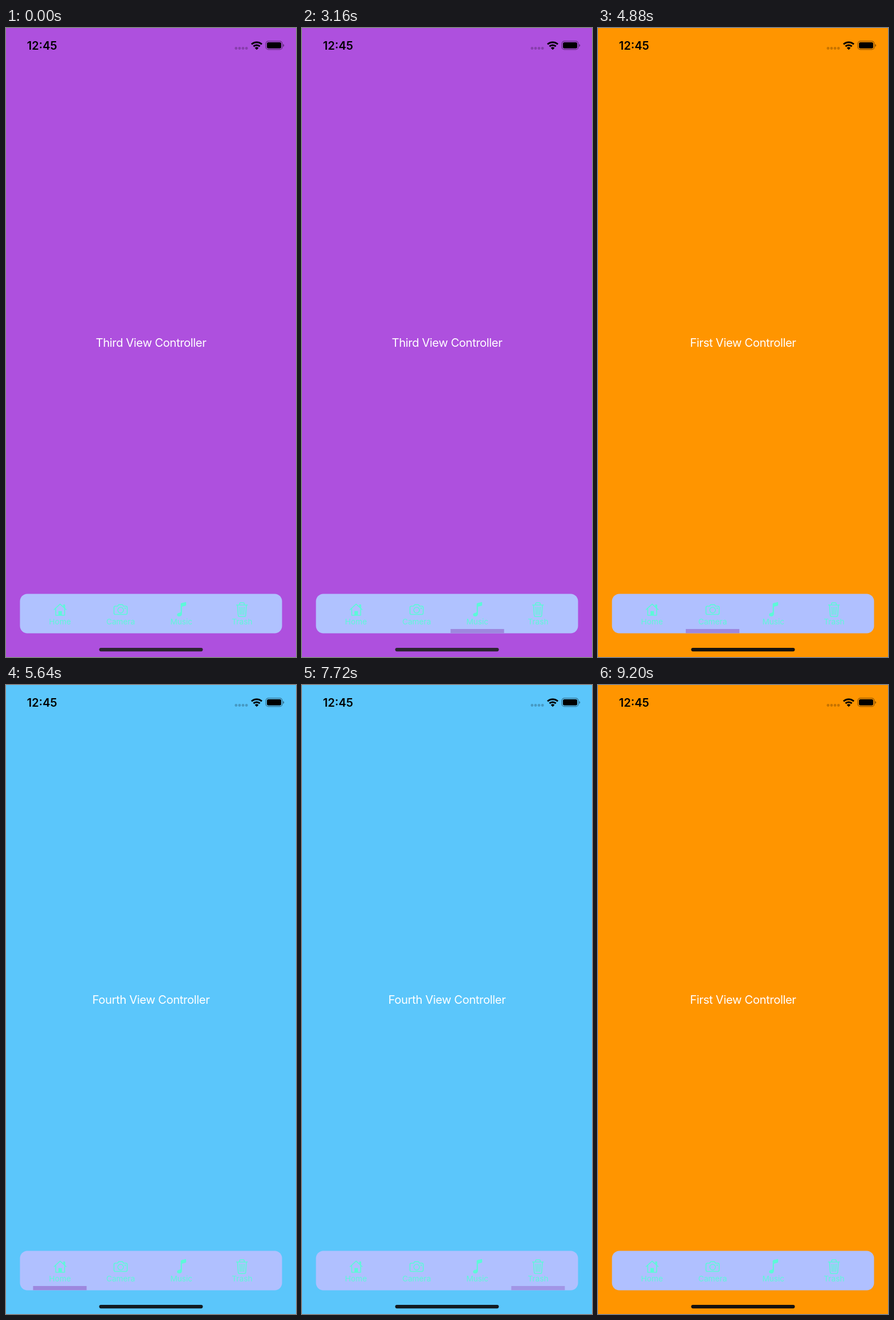
An HTML page for the animation above (9.24 s loop, 509 by 1101 pixels).

```html
<!DOCTYPE html>
<html lang="en">
<head>
<meta charset="utf-8">
<style>
  html, body { margin: 0; width: 100%; height: 100%; overflow: hidden; }
  svg { display: block; width: 509px; height: 1101px; font-family: Inter, Roboto, sans-serif; }
  text { text-anchor: middle; }
  .tabs { fill: none; stroke: #5cf9d8; stroke-width: 1.6; stroke-linejoin: round; stroke-linecap: round; }
  .tabs text { font-size: 13.7px; }
  .tabs text, .tabs .solid { fill: #5cf9d8; stroke: none; }
</style>
</head>
<body>
<svg viewBox="0 0 509 1101">
  <rect id="back" width="509" height="1101"/>

  <text x="63.3" y="38" font-size="20" font-weight="600">12:45</text>
  <g opacity=".22">
    <circle cx="403.8" cy="35.5" r="2.4"/><circle cx="409.9" cy="35.5" r="2.4"/>
    <circle cx="416" cy="35.5" r="2.4"/><circle cx="422.1" cy="35.5" r="2.4"/>
  </g>
  <path d="M431 28.5a13 13 0 0 1 18 0M434.4 32.2a8.2 8.2 0 0 1 11.2 0" fill="none" stroke="#000" stroke-width="3"/>
  <path d="M436.6 34.8a5 5 0 0 1 6.8 0L440 38.2z"/>
  <rect x="456.1" y="23.2" width="28.8" height="14.4" rx="4.2" fill="none" stroke="#000" stroke-width="1.2" opacity=".45"/>
  <rect x="458" y="25.1" width="25" height="10.6" rx="2.5"/>
  <path d="M486.4 28v5q1.7-.8 1.7-2.5t-1.7-2.5z" opacity=".5"/>

  <text id="title" x="254.5" y="558" font-size="20.3" letter-spacing="-.4" fill="#fff"></text>

  <rect id="bar" x="24.5" y="990.5" width="460" height="69" rx="13"/>
  <rect id="mark" y="1052" width="94" height="7.3" fill="#9d88de"/>
  <g class="tabs">
    <path d="M84.5 1018L95 1008.3l10.5 9.7M87.3 1016v12h15.6v-12M101.3 1013.5v-3.7h1.7v5"/>
    <path class="solid" d="M92 1028v-7.5h6.2v7.5z"/>
    <text x="94.7" y="1043.6">Home</text>

    <path d="M192 1012h4l1.6-2.6h7l1.6 2.6h4q2.5 0 2.5 2.5v9.5q0 2.5-2.5 2.5h-18.2q-2.5 0-2.5-2.5v-9.5q0-2.5 2.5-2.5z"/>
    <circle cx="201.2" cy="1019" r="5"/>
    <circle class="solid" cx="209.2" cy="1015.6" r="1.3"/>
    <text x="201.2" y="1043.6">Camera</text>

    <path class="solid" d="M306.6 1008.2q0-1.2 1.2-1.5l7-1.8q1.4-.3 1.4 1v4q0 1.1-1.2 1.4l-6.2 1.6v12.6c0 3-2.4 4.6-5 4.6-2.2 0-3.6-1.2-3.6-3 0-2 1.6-3 3.6-3.4 2-.4 2.8-.7 2.8-2z"/>
    <text x="307.8" y="1043.6">Music</text>

    <path d="M404.5 1010h19.3M410 1010v-2q0-2 2-2h4.200q2 0 2 2v2M406.400 1010l1.200 18q.2 2.200 2.200 2.200h8.700q2 0 2.200-2.200l1.200-18M410.600 1014l.5 12.500M414.200 1014v12.500M417.800 1014l-.5 12.500"/>
    <text x="414.400" y="1043.600">Trash</text>
  </g>
  <rect id="grip" x="163.500" y="1085" width="182" height="6.200" rx="3.100"/>
</svg>
<script>
const LOOP = 9240, FRAME = 40, HOLD = 140, FADE = 300;

// name, background, bar, home grip
const views = [
  ['First', '#ff9500', '#b0c0ff', '#15120e'],
  ['Second', '#ff2c52', '#b0c2ff', '#362c36'],
  ['Third', '#ae50de', '#b0c2ff', '#2c2432'],
  ['Fourth', '#5bc6fb', '#b0c0ff', '#121a20']
];

// time, chosen tab
const taps = [
  [-1000, 2], [1480, 2], [2240, 3], [3160, 2], [4080, 1], [4880, 0],
  [5640, 3], [6360, 0], [6961, 1], [7480, 3], [8120, 2], [8640, 0]
];

const el = id => document.getElementById(id);
const ease = p => p * p * (3 - 2 * p);
const clamp = p => Math.max(0, Math.min(1, p));

function draw(t) {
  const i = taps.findLastIndex(tap => tap[0] <= t);
  const [start, tab] = taps[i];
  const [name, back, bar, grip] = views[tab];
  const age = t - start;

  el('back').setAttribute('fill', back);
  el('bar').setAttribute('fill', bar);
  el('grip').setAttribute('fill', grip);
  el('title').textContent = name + ' View Controller';

  // The outer tabs move the marker one frame late.
  const late = (tab === 0 || tab === 3) && age < FRAME;
  const place = late ? taps[i - 1][1] : tab;
  el('mark').setAttribute('x', 47.5 + 106.6 * place);
  el('mark').setAttribute('opacity', 1 - ease(clamp((age - HOLD) / FADE)));
}

const begin = performance.now();
function tick() {
  const t = (performance.now() - begin) % LOOP;
  draw(Math.floor(t / FRAME) * FRAME);
  requestAnimationFrame(tick);
}
tick();
</script>
</body>
</html>
```
